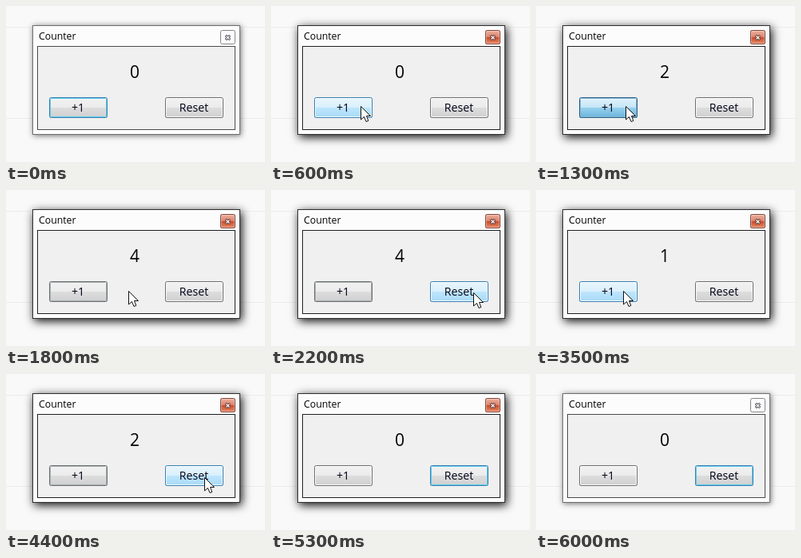
An HTML page with a canvas that plays this animation: 324x195 px, repeating every 6.1 s.

```html
<!DOCTYPE html>
<html lang="en">
<head>
<meta charset="utf-8">
<title>Counter</title>
<style>
html, body { margin: 0; width: 100%; height: 100%; overflow: hidden; background: #f9f9f9; }
canvas { display: block; width: 324px; height: 195px; }
</style>
</head>
<body>
<canvas id="stage" width="324" height="195"></canvas>
<script>
const ctx = document.getElementById('stage').getContext('2d');
const LOOP = 6100, STEP = 100;
const FONT = '"Open Sans", "Noto Sans", sans-serif';

const add = { label: '+1', x: 54, y: 114, w: 73, h: 26, apply: n => n + 1 };
const reset = { ...add, label: 'Reset', x: 199, apply: () => 0 };

// The button is held from down to up; the count changes on up
const click = (button, up, held = STEP) => ({ button, up, down: up - held });
const clicks = [
  click(add, 800), click(add, 1000, 0), click(add, 1400), click(add, 1700),
  click(reset, 2600),
  click(add, 3500), click(add, 3800),
  click(reset, 4900)
];

// The pointer glides to each place in turn and rests there
const entry = { x: 290, y: 136 };
const moves = [
  { from: 100, to: 600, x: 112, y: 125 },
  { from: 1700, to: 2400, x: 265, y: 128 },
  { from: 2600, to: 3100, x: 109, y: 126 },
  { from: 4000, to: 4600, x: 265, y: 129 },
  { from: 5100, to: 5300, x: 280, y: 132 }
];

const gray = ['#f2f2f2', '#ebebeb', '#dddddd', '#cfcfcf'];
const looks = {
  normal: { edge: '#707070', inner: '#fafafa', fill: gray },
  dim: { edge: '#707070', inner: '#a5b0b5', fill: gray },
  focused: { edge: '#3c7fb1', inner: '#58cdf0', fill: gray },
  hover: { edge: '#3c7fb1', inner: '#f4fbfe', fill: ['#eaf6fd', '#d9f0fc', '#bee6fd', '#a7d9f5'] },
  pressed: { edge: '#2c628b', inner: '#86b4cd', fill: ['#e5f4fc', '#c4e5f6', '#98d1ef', '#68b3db'] }
};

const easeOut = k => 1 - (1 - k) ** 2;

function countAt(t) {
  return clicks.filter(c => c.up <= t).reduce((n, c) => c.button.apply(n), 0);
}

function focusAt(t) {
  return clicks.filter(c => c.down <= t).reduce((_, c) => c.button, add);
}

function pointerAt(t) {
  if (t <= moves[0].from || t >= moves[moves.length - 1].to) return null;
  let { x, y } = entry;
  for (const m of moves) {
    const k = easeOut(Math.min(1, Math.max(0, (t - m.from) / (m.to - m.from))));
    x += (m.x - x) * k;
    y += (m.y - y) * k;
  }
  return { x: Math.round(x), y: Math.round(y) };
}

function box(x, y, w, h, color) {
  ctx.fillStyle = color;
  ctx.fillRect(x, y, w, h);
}

function frame(x, y, w, h, r, color) {
  ctx.beginPath();
  ctx.roundRect(x + 0.5, y + 0.5, w - 1, h - 1, r);
  ctx.strokeStyle = color;
  ctx.lineWidth = 1;
  ctx.stroke();
}

// Two-band glass gradient with a hard break in the middle
function glass(y, h, colors) {
  const g = ctx.createLinearGradient(0, y, 0, y + h);
  [0, 0.5, 0.5, 1].forEach((stop, i) => g.addColorStop(stop, colors[i]));
  return g;
}

function text(s, x, y, font, color, align = 'center') {
  ctx.font = font + ' ' + FONT;
  ctx.textAlign = align;
  ctx.fillStyle = color;
  ctx.fillText(s, x, y);
}

function drawClose(active) {
  const x = 268, y = 30, w = 19, h = 18, cx = x + w / 2, cy = y + h / 2 + 0.5;
  ctx.beginPath();
  ctx.roundRect(x, y, w, h, 2);
  ctx.fillStyle = active ? glass(y, h, ['#edb7a5', '#dc8068', '#c9492b', '#e88f68']) : '#fcfcfc';
  ctx.fill();
  frame(x, y, w, h, 2, active ? '#7b4a44' : '#858585');
  if (active) frame(x + 1, y + 1, w - 2, h - 2, 1, 'rgba(255,220,205,.45)');
  ctx.lineCap = 'square';
  for (const [width, color] of [[3, active ? '#673c38' : '#4c4c55'], [1.3, '#fff']]) {
    ctx.beginPath();
    for (const d of [-1.6, 1.6]) {
      ctx.moveTo(cx - d, cy - 1.6);
      ctx.lineTo(cx + d, cy + 1.6);
    }
    ctx.lineWidth = width;
    ctx.strokeStyle = color;
    ctx.stroke();
  }
  ctx.lineCap = 'butt';
}

function drawWindow(active) {
  ctx.save();
  ctx.shadowColor = active ? 'rgba(0,0,0,.95)' : 'rgba(0,0,0,.55)';
  ctx.shadowBlur = active ? 11 : 7;
  ctx.shadowOffsetX = active ? 2 : 1;
  ctx.shadowOffsetY = active ? 3 : 1;
  box(33, 24, 260, 137, active ? '#303030' : '#707070');
  ctx.restore();
  box(34, 25, 258, 135, '#fcfcfc');
  box(39, 50, 248, 105, active ? '#202020' : '#4b4b4b');
  box(40, 51, 246, 103, '#f0f0f0');
  text('Counter', 41, 42, '12.3px', '#000', 'left');
  drawClose(active);
}

function drawButton({ label, x, y, w, h }, state) {
  const look = looks[state];
  ctx.beginPath();
  ctx.roundRect(x, y, w, h, 2);
  ctx.fillStyle = glass(y, h, look.fill);
  ctx.fill();
  frame(x + 1, y + 1, w - 2, h - 2, 1, look.inner);
  frame(x, y, w, h, 2, look.edge);
  text(label, x + w / 2 - 0.5, 132, '500 14.2px', '#000018');
}

function drawPointer({ x, y }) {
  const outline = [[0, 0], [0, 16.5], [4, 13], [6.5, 19], [9.3, 18], [7, 12], [12, 12]];
  ctx.beginPath();
  for (const [dx, dy] of outline) ctx.lineTo(x + dx + 0.5, y + dy + 0.5);
  ctx.closePath();
  ctx.fillStyle = '#fff';
  ctx.fill();
  ctx.lineWidth = 1;
  ctx.strokeStyle = '#111';
  ctx.stroke();
}

function buttonState(b, t, pointer) {
  const over = pointer && pointer.x >= b.x && pointer.x < b.x + b.w
    && pointer.y >= b.y && pointer.y < b.y + b.h;
  if (over) return clicks.some(c => t >= c.down && t < c.up) ? 'pressed' : 'hover';
  if (focusAt(t) !== b) return 'normal';
  return pointer ? 'dim' : 'focused';
}

function draw(now) {
  const t = Math.floor((now % LOOP) / STEP) * STEP;
  const pointer = pointerAt(t);
  box(0, 0, 324, 195, '#f9f9f9');
  for (const y of [26, 140]) box(0, y, 324, 1, '#ececec');
  drawWindow(t >= 100 && t < 6000);
  text(countAt(t), 161, 90, '500 21px', '#000');
  for (const b of [add, reset]) drawButton(b, buttonState(b, t, pointer));
  if (pointer) drawPointer(pointer);
}

const start = performance.now();
function tick() {
  draw(performance.now() - start);
  requestAnimationFrame(tick);
}
tick();
</script>
</body>
</html>
```
